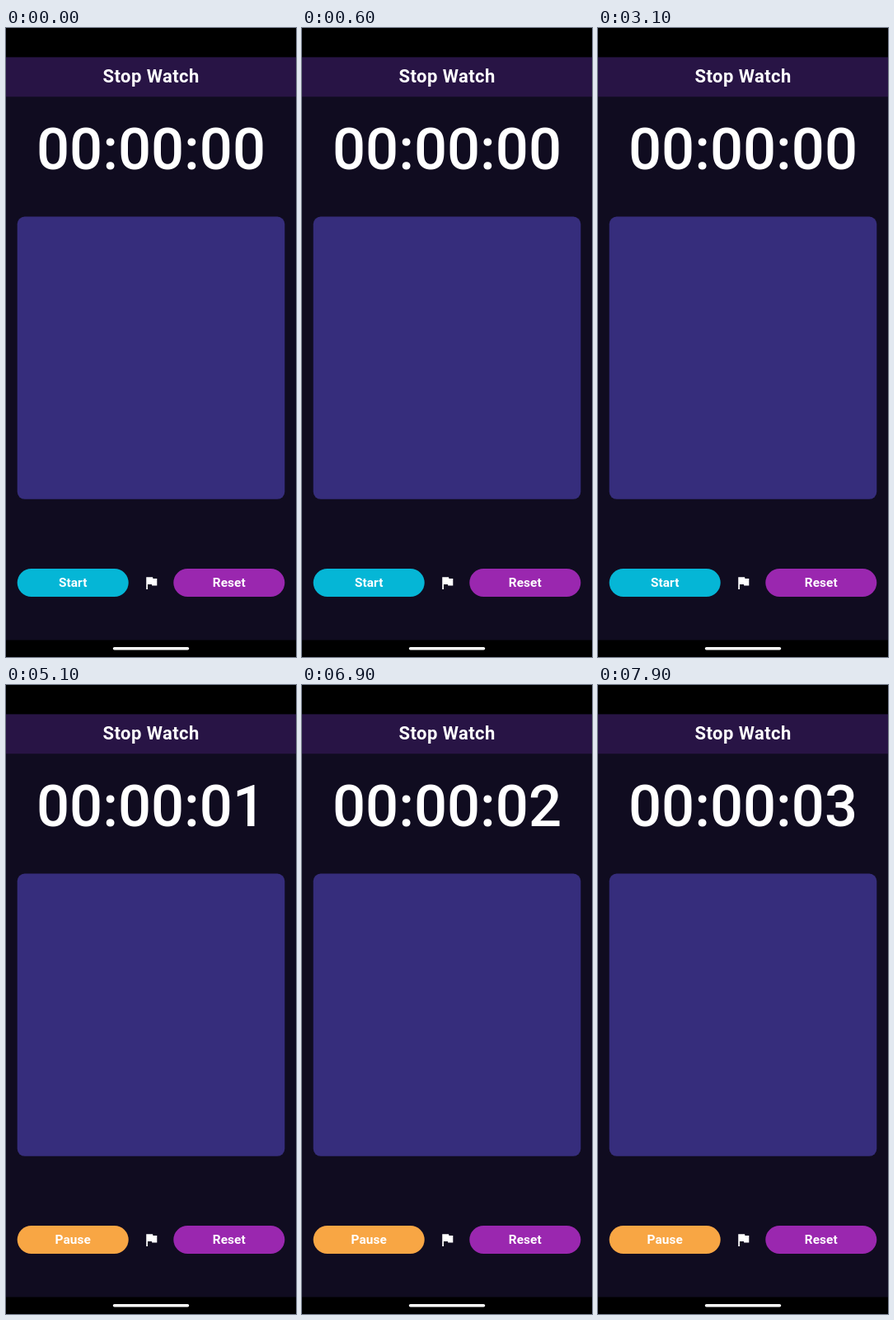
Animation of 352x762 px, one loop 8000 ms. Source, as an HTML page with a canvas:

```html
<!DOCTYPE html>
<html lang="en">
<head>
<meta charset="utf-8">
<title>Stop Watch</title>
<style>
  html, body { margin: 0; width: 100%; height: 100%; overflow: hidden; background: #000; }
  canvas { display: block; width: 352px; height: 762px; }
</style>
</head>
<body>
<canvas id="stage" width="352" height="762"></canvas>
<script>
const ctx = document.getElementById('stage').getContext('2d');
const LOOP = 8000;
const TICKS = [5100, 6900, 7800]; // moments when the seconds advance
const FLAG = new Path2D('M14.4 6L14 4H5v17h2v-7h5.6l.4 2h7V6z');

function rect(x, y, w, h, color, radius = 0) {
  ctx.fillStyle = color;
  ctx.beginPath();
  ctx.roundRect(x, y, w, h, radius);
  ctx.fill();
}

function label(text, x, baseline, weight, size, spacing = 0) {
  ctx.font = `${weight} ${size}px Roboto, sans-serif`;
  ctx.letterSpacing = `${spacing}px`;
  ctx.textAlign = 'center';
  ctx.fillStyle = '#fff';
  ctx.fillText(text, x, baseline);
}

function button(text, x, color) {
  rect(x, 654.9, 135, 34.2, color, 17.1);
  label(text, x + 67.5, 677.2, 700, 15.4, 0.09);
}

function flag() {
  ctx.save();
  ctx.translate(165.9, 661.7);
  ctx.scale(0.87, 0.87);
  ctx.fillStyle = '#fff';
  ctx.fill(FLAG);
  ctx.restore();
}

function draw(time) {
  const seconds = TICKS.filter(tick => time >= tick).length;

  rect(0, 0, 352, 762, '#000');
  rect(0, 35.4, 352, 706, '#100c20');
  rect(0, 35.4, 352, 47.8, '#281445');
  label('Stop Watch', 176.2, 66.4, 600, 22, 0.43);
  label('00:00:' + String(seconds).padStart(2, '0'), 176, 171.3, 500, 70.6);

  rect(13.7, 228.6, 324.6, 342.2, '#362d7c', 9);

  if (seconds) button('Pause', 13.7, '#f8a644');
  else button('Start', 13.7, '#05b6d6');
  flag();
  button('Reset', 203.3, '#9a27af');

  rect(129.8, 749.9, 92.4, 3.5, '#fff', 1.75);
}

const start = performance.now();
function frame() {
  draw((performance.now() - start) % LOOP);
  requestAnimationFrame(frame);
}
frame();
</script>
</body>
</html>
```
